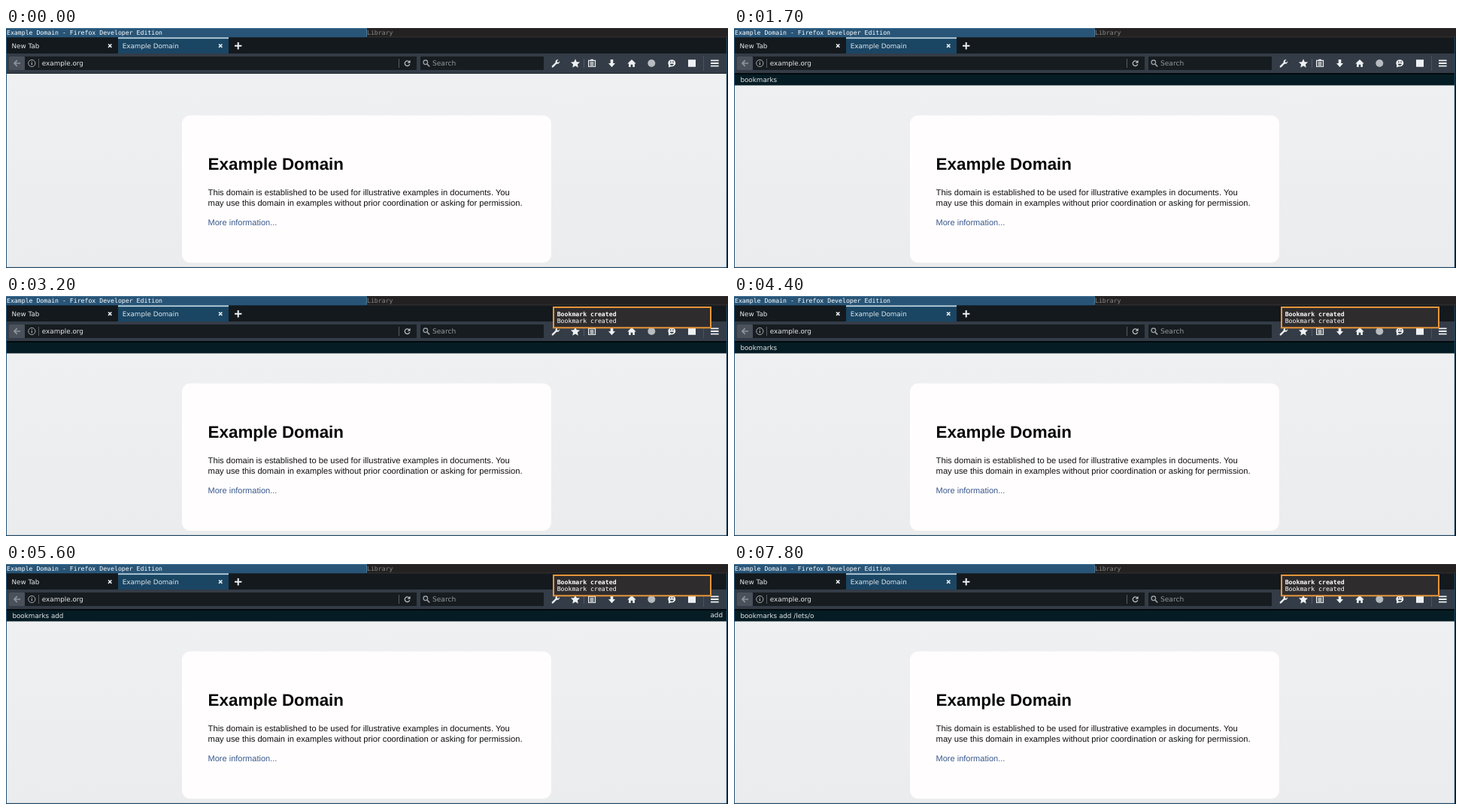
These frames come from a looping animation (960x320 px, 8000 ms). An HTML page:

```html
<!DOCTYPE html>
<html lang="en">
<head>
<meta charset="utf-8">
<title>Bookmark command</title>
<style>
  html, body { margin: 0; width: 100%; height: 100%; overflow: hidden; background: #0b1318; }
  svg { display: block; width: 960px; height: 320px; text-rendering: geometricPrecision; }
  text { white-space: pre; }
  .ui { font: 8.8px "DejaVu Sans", sans-serif; fill: #e4e8ea; }
  .mono { font: 8.2px "DejaVu Sans Mono", monospace; fill: #fff; }
  .page { font: 11.18px "Liberation Sans", Arial, sans-serif; fill: #111; }
  .line { fill: none; stroke: #eef1f3; }
</style>
</head>
<body>
<svg viewBox="0 0 960 320">
  <!-- window titles -->
  <rect width="479" height="12.5" fill="#285577"/>
  <path d="M0 .5H479.5V12" fill="none" stroke="#4c7899"/>
  <rect x="480" width="480" height="12.5" fill="#242122"/>
  <path d="M480 .5H960M480 12H960" stroke="#333"/>
  <text class="mono" x="1" y="9">Example Domain - Firefox Developer Edition</text>
  <text class="mono" x="480" y="9" style="fill:#888">Library</text>

  <!-- tabs -->
  <rect y="13" width="960" height="22" fill="#14191d"/>
  <rect x="149" y="13" width="147" height="21" fill="#1a4563"/>
  <rect x="149" y="12.5" width="147" height="1.7" fill="#c9e4f2"/>
  <text class="ui" x="7.5" y="27">New Tab</text>
  <text class="ui" x="154.7" y="27">Example Domain</text>
  <path class="line" stroke-width="1.5" d="M136 21.5l4.4 4.4m0-4.4l-4.4 4.4M283 21.5l4.4 4.4m0-4.4l-4.4 4.4"/>
  <path class="line" stroke-width="2" d="M304 23.7h9.4M308.7 19v9.4"/>

  <!-- toolbar -->
  <rect y="34" width="960" height="27" fill="#343c47"/>
  <rect x="4" y="38" width="21" height="18" rx="1.5" fill="#4a515b"/>
  <rect x="25" y="38" width="521" height="18" fill="#171c20"/>
  <rect x="551" y="38" width="164" height="18" rx="1" fill="#171c20"/>
  <path d="M19 47h-8m3.8-3.8L11 47l3.8 3.8" fill="none" stroke="#8d949b" stroke-width="1.7"/>
  <circle cx="34.3" cy="47" r="4.6" fill="none" stroke="#a6abb0"/>
  <path d="M34.3 46v3.5m0-5.6v1.1" stroke="#b4b9bd" stroke-width="1.1"/>
  <path d="M43.5 41v12M522.5 41v12" stroke="#565c62"/>
  <text class="ui" x="47.8" y="50.3">example.org</text>
  <path d="M536.3 45.3a3.3 3.3 0 1 0 .4 3" fill="none" stroke="#b8bdc1" stroke-width="1.3"/>
  <path d="M537.6 42.8v4h-4z" fill="#b8bdc1"/>
  <circle cx="557.8" cy="45.8" r="2.8" fill="none" stroke="#9ba1a6" stroke-width="1.3"/>
  <path d="M559.8 48l3.3 3.3" stroke="#9ba1a6" stroke-width="1.7"/>
  <text class="ui" x="567" y="50.3" style="font-size:9.1px;fill:#91979c">Search</text>

  <g fill="#eef1f3">
    <path d="M726 50.5l4.6-4.4a3.2 3.2 0 0 1 4-4l-2 2 .4 1.5 1.5.3 1.7-1.8a3.2 3.2 0 0 1-4 3.6l-4.5 4.6a1.2 1.2 0 0 1-1.7-1.8z"/>
    <path d="M757 41.2l1.8 4 4.3.4-3.2 2.9.9 4.3-3.8-2.2-3.8 2.2.9-4.3-3.2-2.9 4.3-.4z"/>
    <path d="M801 47h2.7v-5h3.6v5h2.7l-4.5 5.3z"/>
    <path d="M826.3 47.4l5.7-5.4 5.7 5.4h-1.8v4.6h-2.6v-3.3h-2.6V52h-2.6v-4.6z"/>
    <ellipse cx="885.3" cy="46.8" rx="5" ry="4.6"/>
    <path d="M881 48v4.4l4-1.5z"/>
    <rect x="907" y="42.2" width="10" height="9.6"/>
  </g>
  <circle cx="858.3" cy="47" r="5" fill="#b7bcc0"/>
  <path d="M882.5 47.8a2.9 2.9 0 0 0 5.6 0zM883 44.4h1.5v1.6H883zM886.2 44.4h1.5v1.6h-1.5z" fill="#343c47"/>
  <path class="line" stroke-width="1.2" d="M774.6 43.3h8.9v8.2h-8.9zM777 42.3h4M776.5 45.7h5M776.5 47.7h5M776.5 49.7h5"/>
  <path d="M768.5 41v12" stroke="#545d67"/>
  <path d="M927.5 37v20" stroke="#315b78"/>
  <path class="line" stroke-width="1.8" d="M937 43.3h10.6M937 47h10.6M937 50.7h10.6"/>

  <!-- page -->
  <linearGradient id="sky" x2="0" y2="1">
    <stop stop-color="#eff0f1"/><stop offset="1" stop-color="#ebeced"/>
  </linearGradient>
  <rect y="60.5" width="958" height="258.5" fill="url(#sky)"/>
  <path d="M0 60.5H958" stroke="#20252b"/>
  <rect x="234" y="116.5" width="491" height="196.5" rx="11" fill="#fffdfe"/>
  <text class="page" x="268.6" y="189" style="font-size:22.4px;font-weight:bold;fill:#080808">Example Domain</text>
  <text class="page" x="268.6" y="222.6">This domain is established to be used for illustrative examples in documents. You</text>
  <text class="page" x="268.6" y="237.4">may use this domain in examples without prior coordination or asking for permission.</text>
  <text class="page" x="268.6" y="263.3" style="font-size:11px;fill:#38588c">More information...</text>

  <!-- command line -->
  <g id="bar">
    <rect y="60" width="958" height="17" fill="#061c24"/>
    <path d="M0 61H958" stroke="#02090c" stroke-width="2"/>
    <path d="M0 76.5H958" stroke="#7e888c"/>
    <text id="typed" class="ui" x="8.4" y="72.3"></text>
    <text id="hint" class="ui" x="953" y="71.2" text-anchor="end"></text>
  </g>

  <!-- window frame -->
  <path d="M.5 13V319.3H958.3V13" fill="none" stroke="#285577"/>
  <rect x="958.8" y="13" width="1.2" height="307" fill="#10171c"/>

  <g id="notice">
    <rect x="728" y="15" width="209" height="27.3" fill="#2f2c2e" stroke="#e8963a" stroke-width="2"/>
    <text class="mono" x="732.7" y="26.5" font-weight="bold" style="font-weight:bold">Bookmark created</text>
    <text class="mono" x="732.7" y="36">Bookmark created</text>
  </g>
</svg>
<script>
const LOOP = 8000, BAR_AT = 600, NOTICE_AT = 3200;
const all = 'help | bookmarks', cmd = 'bookmarks', path = cmd + ' add ';

// [start in ms, typed text, completion hint]
const steps = [
  [0, '', ''], [600, '', all], [1000, 'b', all], [1200, 'bo', cmd],
  [1600, 'boo', cmd], [1700, cmd, ''], [1800, cmd + ' ', 'add'],
  [2100, cmd + ' a', 'add'], [2400, cmd + ' ad', 'add'], [2500, cmd + ' add', 'add'],
  [3200, '', ''], [3400, '', all], [3700, 'b', all],
  [4000, 'bo', all], [4100, 'bo', cmd], [4400, cmd, ''],
  [4800, cmd + ' ', 'add'], [5200, cmd + ' a', 'add'], [5400, cmd + ' ad', 'add'],
  [5600, cmd + ' add', 'add'], [6100, path, ''],
  ...[6400, 6700, 6800, 7000, 7100, 7400, 7800]
    .map((at, i) => [at, path + '/lets/o'.slice(0, i + 1), ''])
];

const get = id => document.getElementById(id);
const bar = get('bar'), notice = get('notice'), typed = get('typed'), hint = get('hint');
const show = (el, on) => { el.style.display = on ? '' : 'none'; };
const start = performance.now();

function draw(now) {
  const t = Math.max(0, now - start) % LOOP;
  const [, text, help] = steps.filter(s => s[0] <= t).pop();
  typed.textContent = text;
  hint.textContent = help;
  show(bar, t >= BAR_AT);
  show(notice, t >= NOTICE_AT);
  requestAnimationFrame(draw);
}
draw(start);
</script>
</body>
</html>
```
